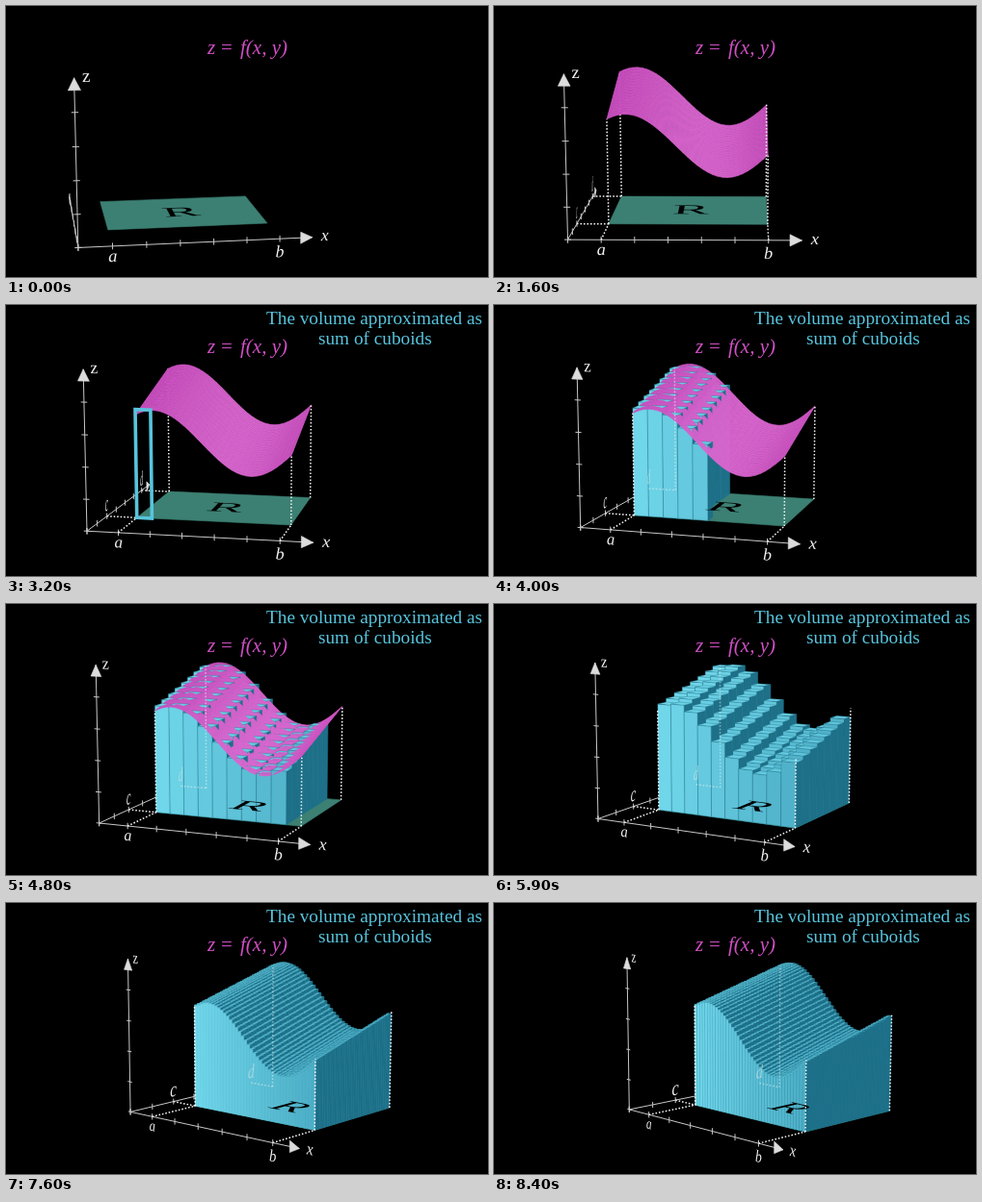
An HTML page with a canvas for the animation above (8.5 s loop, 500 by 282 pixels).

```html
<!DOCTYPE html>
<html>
<head>
<meta charset="utf-8">
<style>
html, body { margin: 0; width: 100%; height: 100%; overflow: hidden; background: #000; }
canvas { display: block; }
</style>
</head>
<body>
<canvas id="stage" width="500" height="282"></canvas>
<script>
const ctx = document.getElementById('stage').getContext('2d');
const LOOP = 8500, STEP = 100;
const UNIT = 35.25, DISTANCE = 37, RAD = Math.PI / 180;
const COS_TILT = Math.cos(80 * RAD), SIN_TILT = Math.sin(80 * RAD);
const SERIF = '"Liberation Serif", serif';
const BLUE = '#58c4dd', PINK = '#d04fc4', WHITE = '#dcdcdc';
// The region R is [A, B] x [C, D].
const A = 1, B = 6, C = 2, D = 6;

let cosTurn = 1, sinTurn = 0;

const height = (x, y) => Math.sin(x) + y / 4 + 2;
const ramp = (t, from, to) => Math.min(1, Math.max(0, (t - from) / (to - from)));
const mix = (p, q, k) => p.map((v, i) => v + (q[i] - v) * k);
const rgb = c => `rgb(${c.map(Math.round)})`;

// Screen x, screen y and nearness to the camera.
function project([x, y, z]) {
  const right = (x - 5) * cosTurn + y * sinTurn;
  const away = y * cosTurn - (x - 5) * sinTurn;
  const up = away * COS_TILT + (z - 3) * SIN_TILT;
  const near = (z - 3) * COS_TILT - away * SIN_TILT;
  const scale = UNIT / (1 - near / DISTANCE);
  return [250 + right * scale, 141 - up * scale, near];
}

function trace(projected) {
  ctx.beginPath();
  for (const [x, y] of projected) ctx.lineTo(x, y);
}

function polygon(projected, fill, edge = fill) {
  trace(projected);
  ctx.closePath();
  ctx.fillStyle = fill;
  ctx.fill();
  ctx.strokeStyle = edge;
  ctx.lineWidth = 0.6;
  ctx.stroke();
}

function line(points, color = '#c8c8c8', width = 1) {
  trace(points.map(project));
  ctx.strokeStyle = color;
  ctx.lineWidth = width;
  ctx.stroke();
}

function dotted(from, to, part = 1) {
  if (part <= 0) return;
  ctx.setLineDash([1.6, 1.9]);
  line([from, mix(from, to, part)], '#f4f4f4', 1.5);
  ctx.setLineDash([]);
}

// Text lying in the plane spanned by the directions u (reading) and down.
function label(text, at, u, down, size, style = 'italic', color = '#f0f0f0') {
  const add = v => project(at.map((p, i) => p + v[i]));
  const o = project(at), a = add(u), b = add(down);
  ctx.save();
  ctx.transform(a[0] - o[0], a[1] - o[1], b[0] - o[0], b[1] - o[1], o[0], o[1]);
  ctx.scale(size / 100, size / 100);
  ctx.font = `${style} 100px ${SERIF}`;
  ctx.textAlign = 'center';
  ctx.fillStyle = color;
  ctx.fillText(text, 0, 0);
  ctx.restore();
}

const alongX = (text, at, style) => label(text, at, [1, 0, 0], [0, 0, -1], 0.53, style);
const alongY = (text, at) => label(text, at, [0, 1, 0], [0, 0, -1], 0.72);

function axis(point, length, ticks) {
  line([point(0, 0), point(length, 0)]);
  for (let i = 0; i <= ticks; i++) line([point(i, -0.1), point(i, 0.1)]);
  const head = [point(length, 0), point(length - 0.36, 0.18), point(length - 0.36, -0.18)];
  polygon(head.map(project), WHITE);
}

function axes() {
  axis((d, s) => [0, d, s], 7, 6);
  axis((d, s) => [s, 0, d], 5, 4);
  axis((d, s) => [d, 0, s], 7, 6);
  alongX('a', [A, 0, -0.47]);
  alongX('b', [B, 0, -0.57]);
  alongX('x', [7.38, 0, -0.12]);
  alongX('z', [0.34, 0, 4.88], 'normal');
}

function face(points, fill, edge, alpha = 1) {
  const projected = points.map(project);
  const near = projected.reduce((sum, p) => sum + p[2], 0) / points.length;
  return { projected, near, fill, edge, alpha };
}

// Faces are painted in the order of their centres, farthest first.
function paint(faces) {
  faces.sort((p, q) => p.near - q.near);
  for (const f of faces) {
    ctx.globalAlpha = f.alpha;
    polygon(f.projected, f.fill, f.edge);
  }
  ctx.globalAlpha = 1;
}

function surfaceFaces(part, alpha) {
  const faces = [], n = 32, dx = (B - A) / n, dy = (D - C) / n;
  if (!alpha) return faces;
  for (let i = 0; i < Math.round(n * part); i++) {
    const x = A + i * dx;
    const fill = rgb(mix([200, 78, 190], [216, 102, 206], 0.5 - 0.5 * Math.cos(x - 0.6)));
    for (let j = 0; j < n; j++) {
      const y = C + j * dy;
      const ring = [[x, y], [x + dx, y], [x + dx, y + dy], [x, y + dy]];
      faces.push(face(ring.map(([u, v]) => [u, v, height(u, v)]), fill, fill, alpha));
    }
  }
  return faces;
}

// Cuboids appear one by one, column after column from a to b.
function cuboidFaces(size, part) {
  const faces = [], rows = (D - C) / size, total = rows * (B - A) / size;
  const fine = size < 0.2;
  for (let k = 0; k < Math.floor(total * part); k++) {
    const j = k % rows, x = A + Math.floor(k / rows) * size, y = C + j * size;
    const x2 = x + size, y2 = y + size, h = height(x + size / 2, y + size / 2);
    const shade = (x - A) / (B - A);
    const front = rgb(mix([112, 214, 234], [76, 174, 198], shade));
    const top = rgb(mix([112, 214, 234], [94, 196, 218], shade));
    const edge = fine ? 'rgba(25,105,125,.22)' : 'rgba(20,95,115,.5)';
    const side = '#1e7088';
    faces.push(
      face([[x2, y, 0], [x2, y2, 0], [x2, y2, h], [x2, y, h]], side, side),
      face([[x, y, 0], [x2, y, 0], [x2, y, h], [x, y, h]], front, fine && j === 0 ? front : edge),
      face([[x, y, h], [x2, y, h], [x2, y2, h], [x, y2, h]], top, edge));
  }
  return faces;
}

function frameCuboid(part) {
  const x2 = A + 0.5, h = height(A + 0.25, C + 0.25) * part;
  ctx.lineJoin = 'miter';
  trace([[A, C, 0], [x2, C, 0], [x2, C, h], [A, C, h]].map(project));
  ctx.closePath();
  ctx.strokeStyle = BLUE;
  ctx.lineWidth = 3.6;
  ctx.stroke();
}

function rearGuides(ground, rise) {
  dotted([0, D, 0], [A, D, 0], ground);
  dotted([A, D, 0], [A, D, height(A, D)], rise);
  if (ground > 0) alongY('d', [0, D, 0.18]);
}

function frontGuides(ground, rise) {
  dotted([0, C, 0], [A, C, 0], ground);
  dotted([A, 0, 0], [A, C, 0], ground);
  dotted([B, 0, 0], [B, C, 0], ground);
  for (const [x, y] of [[A, C], [B, C], [B, D]]) dotted([x, y, 0], [x, y, height(x, y)], rise);
  if (ground > 0) alongY('c', [0, C, 0.18]);
}

function flatText(text, x, y, size, color, style = '') {
  ctx.font = `${style} ${size}px ${SERIF}`;
  ctx.textAlign = 'left';
  ctx.fillStyle = color;
  ctx.fillText(text, x, y);
}

function captions(t) {
  flatText('z', 209, 50, 21, PINK, 'italic');
  flatText('=', 223, 50, 21, PINK);
  flatText('f(x, y)', 243, 50, 21, PINK, 'italic');
  const first = 'The volume approximated as', second = 'sum of cuboids';
  const count = Math.round(ramp(t, 1900, 2600) * (first.length + second.length));
  flatText(first.slice(0, count), 270, 20, 19.25, BLUE);
  flatText(second.slice(0, Math.max(0, count - first.length)), 324, 41, 19.25, BLUE);
}

function draw(t) {
  const turn = (-10 + 6.7 * t / 1000) * RAD;
  cosTurn = Math.cos(turn);
  sinTurn = Math.sin(turn);
  ctx.fillStyle = '#000';
  ctx.fillRect(0, 0, 500, 282);

  const ground = ramp(t, 200, 700), rise = ramp(t, 500, 1000);
  polygon([[A, C, 0], [B, C, 0], [B, D, 0], [A, D, 0]].map(project), '#3c8073');
  axes();
  rearGuides(ground, rise);

  const cuboids = t < 6050
    ? cuboidFaces(0.5, ramp(t, 3300, 4950))
    : cuboidFaces(0.125, ramp(t, 6050, 6903));
  paint([...cuboids, ...surfaceFaces(ramp(t, 500, 1300), 1 - ramp(t, 5000, 5500))]);

  if (cuboids.length) {
    ctx.globalAlpha = 0.5;
    rearGuides(1, 1);
    ctx.globalAlpha = 1;
  }
  label('R', [(A + B) / 2, 3.4, 0], [1, 0, 0], [0, -1, 0], 1.8, 'normal', '#000');
  frontGuides(ground, rise);
  if (t >= 2700 && t < 3400) frameCuboid(ramp(t, 2600, 3100));
  captions(t);
}

let shown = -1;
function tick() {
  const t = Math.floor(performance.now() % LOOP / STEP) * STEP;
  if (t !== shown) draw(shown = t);
  requestAnimationFrame(tick);
}
tick();
</script>
</body>
</html>
```
